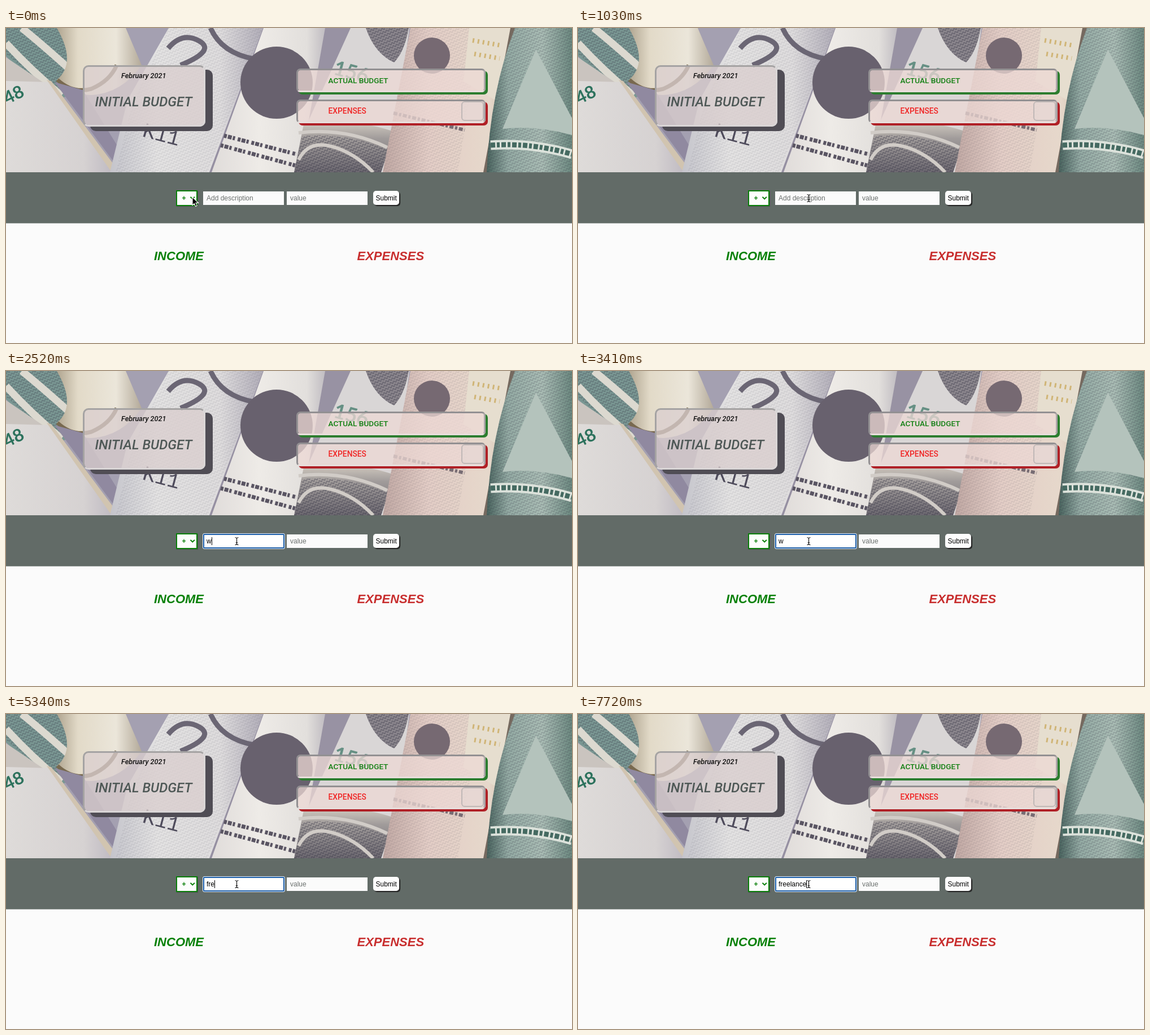
Animation of 1002 by 559 pixels, one loop 8 s. Source, as an HTML page:

```html
<!DOCTYPE html>
<html lang="en">
<head>
<meta charset="utf-8">
<title>Budget</title>
<style>
html, body { margin: 0; width: 100%; height: 100%; overflow: hidden; background: #fbfbfb; }
svg { position: absolute; left: 0; top: 0; display: block; }
div { position: absolute; box-sizing: border-box; }
.card { border: 3px solid; background-clip: padding-box; }
.initial { left: 136px; top: 66px; width: 217px; height: 109px; border-radius: 10px;
  background-color: rgba(218, 207, 207, .76); box-shadow: 13px 8px #504d55; border-color: #a5a3a3 #dad6d6 #dad6d6 #a5a3a3; }
.row { left: 514px; width: 335px; height: 42px; border-radius: 7px; background-color: rgba(238, 217, 214, .74);
  border-color: #929092 #aaa4a6 #e8dedc #929092; }
.actual { top: 72px; box-shadow: 4px 4px #2c7d2f; }
.spent { top: 127px; box-shadow: 4px 4px #b02026; }
.percent { left: 806px; top: 130px; width: 40px; height: 35px; border: 2px solid #c0b8b7; border-radius: 6px;
  background: rgba(228, 215, 212, .6); }
.bar { left: 0; top: 256px; width: 1002px; height: 90px; background: #626b67; box-shadow: 0 1px #a5aaa7; }
.pick { left: 301px; top: 288px; width: 38px; height: 28px; border: 2px solid #0a800a; background: #fdfdfd;
  box-shadow: 1px 1px 1px rgba(0, 0, 0, .2); }
.field { top: 290px; width: 143px; height: 24px; background: #fbfbfb; }
.ring { left: 348px; top: 288px; width: 146px; height: 28px; border: 1px solid #e6eef8; border-radius: 3px; background: #fff; }
.ring::after { content: ""; position: absolute; inset: 0; border: 2px solid #1c5ea8; border-radius: 2px; }
.send { left: 650px; top: 289px; width: 46px; height: 25px; border-radius: 5px; background: #fdfdfd; box-shadow: 2px 2px 1px #222; }
text { white-space: pre; }
.ui { font: 12px "Liberation Sans", Arial, sans-serif; }
.head { font: italic bold 22px "Liberation Sans", Arial, sans-serif; }
.din { font-family: Roboto, sans-serif; font-weight: 500; }
.hint { fill: #6b706e; }
</style>
</head>
<body>
<svg width="1002" height="256" viewBox="0 0 1002 256">
  <defs>
    <linearGradient id="left"><stop stop-color="#dedbd9"/><stop offset=".7" stop-color="#d6d2d2"/><stop offset="1" stop-color="#bcb7c0"/></linearGradient>
    <linearGradient id="cream"><stop stop-color="#b0a590"/><stop offset=".25" stop-color="#e2dac8"/><stop offset=".7" stop-color="#ebe6da"/><stop offset="1" stop-color="#b3a999"/></linearGradient>
    <linearGradient id="pale"><stop stop-color="#c4c4cb"/><stop offset=".3" stop-color="#e3e2e2"/><stop offset=".7" stop-color="#dedcdd"/><stop offset="1" stop-color="#aca8b4"/></linearGradient>
    <linearGradient id="white"><stop stop-color="#e0dcda"/><stop offset=".4" stop-color="#eeebe7"/><stop offset=".8" stop-color="#e2dfdc"/><stop offset="1" stop-color="#b6b2ba"/></linearGradient>
    <linearGradient id="pink"><stop stop-color="#c0a8a3"/><stop offset=".35" stop-color="#e3cdc6"/><stop offset=".8" stop-color="#e6d8cb"/><stop offset="1" stop-color="#c8b69f"/></linearGradient>
    <linearGradient id="green"><stop stop-color="#48635d"/><stop offset=".25" stop-color="#93aaa3"/><stop offset=".65" stop-color="#a9bcb4"/><stop offset="1" stop-color="#6b887f"/></linearGradient>
    <linearGradient id="dark" x2="0" y2="1"><stop stop-color="#d5cec3"/><stop offset=".35" stop-color="#a09b9a"/><stop offset="1" stop-color="#6c6870"/></linearGradient>
    <pattern id="ink" width="6" height="6" patternUnits="userSpaceOnUse" patternTransform="rotate(-24)">
      <path d="M0 3Q1.5 0 3 3T6 3" fill="none" stroke="#302f40" stroke-width="1.2"/>
    </pattern>
  </defs>

  <path fill="#a4a0b1" d="M0 0H1002V256H0Z"/>

  <!-- left notes -->
  <path fill="#7a9793" d="M0 0H108L160 106 78 130 0 50Z"/>
  <path fill="url(#ink)" opacity=".45" d="M0 0H92L134 84 88 120 0 46Z"/>
  <path fill="none" stroke="#dcd9d0" stroke-width="13" d="M0 27Q45 76 98 120M28 0Q65 30 118 78"/>
  <path fill="#cac4bf" d="M0 52 68 98 105 145 0 125Z"/>
  <path fill="url(#cream)" d="M90 0H212L240 66Q205 116 151 119Q104 117 90 92Q126 62 90 0Z"/>
  <path fill="none" stroke="#78694f" stroke-width="7" d="M91 92Q118 117 151 108Q184 94 196 66"/>
  <path fill="url(#left)" d="M0 94 76 96 196 256H0Z"/>
  <path fill="#d1c4b0" d="M72 92 80 94 201 256H187Z"/>
  <path fill="#9089a0" d="M86 96 136 110 207 225 200 250Z"/>
  <text x="2" y="136" transform="rotate(-26 2 136)" fill="#2d725d" style="font:bold 31px Lato,sans-serif">48</text>

  <!-- middle rolls -->
  <path fill="url(#pale)" d="M288 0H463L365 256H184L215 128Z"/>
  <path fill="url(#ink)" opacity=".13" d="M288 0H455L357 256H194L225 128Z"/>
  <path fill="none" stroke="#6b6674" stroke-width="9" d="M287 36Q312 6 342 23T309 66M362 0Q382 45 440 55"/>
  <text x="240" y="192" transform="rotate(15 240 192)" fill="#4e4b5b" style="font:37px 'Liberation Mono',monospace">K11</text>
  <path fill="#9690a2" d="M455 0H478L386 256H360Z"/>
  <path fill="url(#white)" d="M456 0H575L548 115 514 256H364Z"/>
  <circle cx="479" cy="97" r="64" fill="#68616e"/>
  <g fill="none" stroke="#5a5563" stroke-width="7" stroke-dasharray="5 2 7 2 4 5">
    <path d="M386 191 514 224M380 208 512 244"/>
  </g>
  <path fill="#9892a3" d="M565 0H616L559 165 535 170Z"/>
  <path fill="#d9d6d6" d="M610 0H714L681 256H560L533 170Z"/>
  <path fill="#8b868d" d="M637 0H713Q705 43 687 61Q653 46 637 0Z"/>
  <path fill="url(#ink)" opacity=".6" d="M637 0H713Q705 43 687 61Q653 46 637 0Z"/>
  <text x="578" y="82" transform="rotate(15 578 82)" fill="#669084" style="font:bold 36px Lato,sans-serif">156</text>
  <path fill="url(#dark)" d="M528 166Q605 158 688 184L664 256H510Z"/>
  <path fill="url(#ink)" opacity=".6" d="M524 192Q594 184 677 215L664 256H510Z"/>
  <path fill="none" stroke="#d1ccc7" stroke-width="6" d="M518 234Q535 199 576 210T650 256M518 186Q600 176 675 212"/>

  <!-- right rolls -->
  <path fill="url(#pink)" d="M716 0H902L848 256H667Z"/>
  <path fill="url(#ink)" opacity=".14" d="M716 0H840L800 256H667Z"/>
  <circle cx="754" cy="49" r="32" fill="#766972"/>
  <path fill="#e6decf" d="M820 0H900L866 128 810 95Z"/>
  <g fill="none" stroke="#d0b577" stroke-width="8" stroke-dasharray="3 6"><path d="M826 22 877 31M829 46 874 54"/></g>
  <path fill="none" stroke="#776c73" stroke-width="6" stroke-dasharray="7 3 4 3" d="M686 151 812 181"/>
  <path fill="#75695f" d="M893 0H904L858 256H845Z"/>
  <path fill="url(#green)" d="M901 0H1002V256H851Q857 114 901 0Z"/>
  <path fill="url(#ink)" opacity=".32" d="M901 0H1002V256H851Q857 114 901 0Z"/>
  <path fill="#b4c3bc" d="M938 38 1002 160V190Q938 172 879 179Z"/>
  <path fill="none" stroke="#dce2db" stroke-width="17" d="M858 208Q930 203 1002 224"/>
  <path fill="none" stroke="#456a61" stroke-width="9" stroke-dasharray="8 3 5 3" d="M858 208Q930 203 1002 224"/>
</svg>

<div class="card initial"></div>
<div class="card row actual"></div>
<div class="card row spent"></div>
<div class="percent"></div>
<div class="bar"></div>
<div class="pick"></div>
<div class="field" style="left:349px"></div>
<div class="field" style="left:497px"></div>
<div class="ring" id="ring"></div>
<div class="send"></div>

<svg width="1002" height="559" viewBox="0 0 1002 559">
  <g class="din">
    <text x="204" y="89" font-size="12.7" font-style="italic" fill="#111">February 2021</text>
    <text x="157.5" y="139" font-size="23.9" font-style="italic" fill="#4e5856">INITIAL BUDGET</text>
    <text x="570.5" y="98" font-size="13.6" fill="#138013">ACTUAL BUDGET</text>
    <text x="570.5" y="152" font-size="13.8" fill="#f02424">EXPENSES</text>
  </g>
  <g class="head">
    <text x="262" y="412" fill="#078007">INCOME</text>
    <text x="621.5" y="412" fill="#c82e2e">EXPENSES</text>
  </g>
  <g class="ui">
    <text x="311.5" y="306" fill="#0a800a" font-weight="bold">+</text>
    <path d="M326.5 299.7 330.2 303.4 333.9 299.7" fill="none" stroke="#0a800a" stroke-width="2"/>
    <text class="hint" id="hint" x="355" y="306">Add description</text>
    <text id="typed" x="355" y="306"></text>
    <text class="hint" x="503" y="306">value</text>
    <text x="654.5" y="306">Submit</text>
  </g>
  <path id="caret" d="M.5 295V309" stroke="#000"/>
  <path id="arrow" d="M0 0V14.6L3.3 11.5 5.5 16.6 8.2 15.4 6 10.4H10.6Z" stroke="#fff" stroke-width="1.1"/>
  <path id="beam" fill="none" stroke="#111" stroke-width="1.2"
    d="M-3-6.5Q-.6-6.5 0-5Q.6-6.5 3-6.5M0-5V5M-3 6.5Q-.6 6.5 0 5Q.6 6.5 3 6.5M-1.7 2.5H1.7"/>
</svg>

<script>
const LOOP = 8000;
const $ = id => document.getElementById(id);

// time, pointer x, pointer y
const moves = [
  [0, 330, 300], [150, 323, 304], [300, 313, 307], [450, 320, 307],
  [590, 336, 306], [740, 380, 304], [890, 412, 302], [1030, 408.5, 302]
];

// time, typed text, caret shown
const typing = [
  [1480, "", 1], [1930, "", 0], [2370, "", 1], [2520, "w", 1],
  [2960, "we", 1], [3410, "w", 0], [3700, "", 0], [4000, "", 1],
  [4450, "", 0], [4890, "", 1], [5040, "fr", 1], [5340, "fre", 1],
  [5640, "free", 1], [6080, "free", 0], [6680, "free", 1], [6970, "freel", 1],
  [7270, "freela", 1], [7420, "freelan", 1], [7570, "freelanc", 1], [7720, "freelance", 1]
];

const stepAt = (steps, t) => steps.filter(s => s[0] <= t).pop();
const show = (el, on) => { el.style.display = on ? "" : "none"; };
const place = (el, x, y) => el.setAttribute("transform", `translate(${x} ${y})`);

function draw(t) {
  const [, x, y] = stepAt(moves, t);
  const overField = x >= 349;
  show($("beam"), overField);
  show($("arrow"), !overField);
  place(overField ? $("beam") : $("arrow"), x, y);

  const state = stepAt(typing, t);
  const [, text, caret] = state || [0, "", 0];
  show($("ring"), state);
  show($("hint"), !text);
  $("typed").textContent = text;
  show($("caret"), caret);
  const width = text ? $("typed").getComputedTextLength() : 0;
  place($("caret"), Math.round(355 + width), 0);
}

function tick() {
  draw(performance.now() % LOOP);
  requestAnimationFrame(tick);
}
tick();
</script>
</body>
</html>
```
